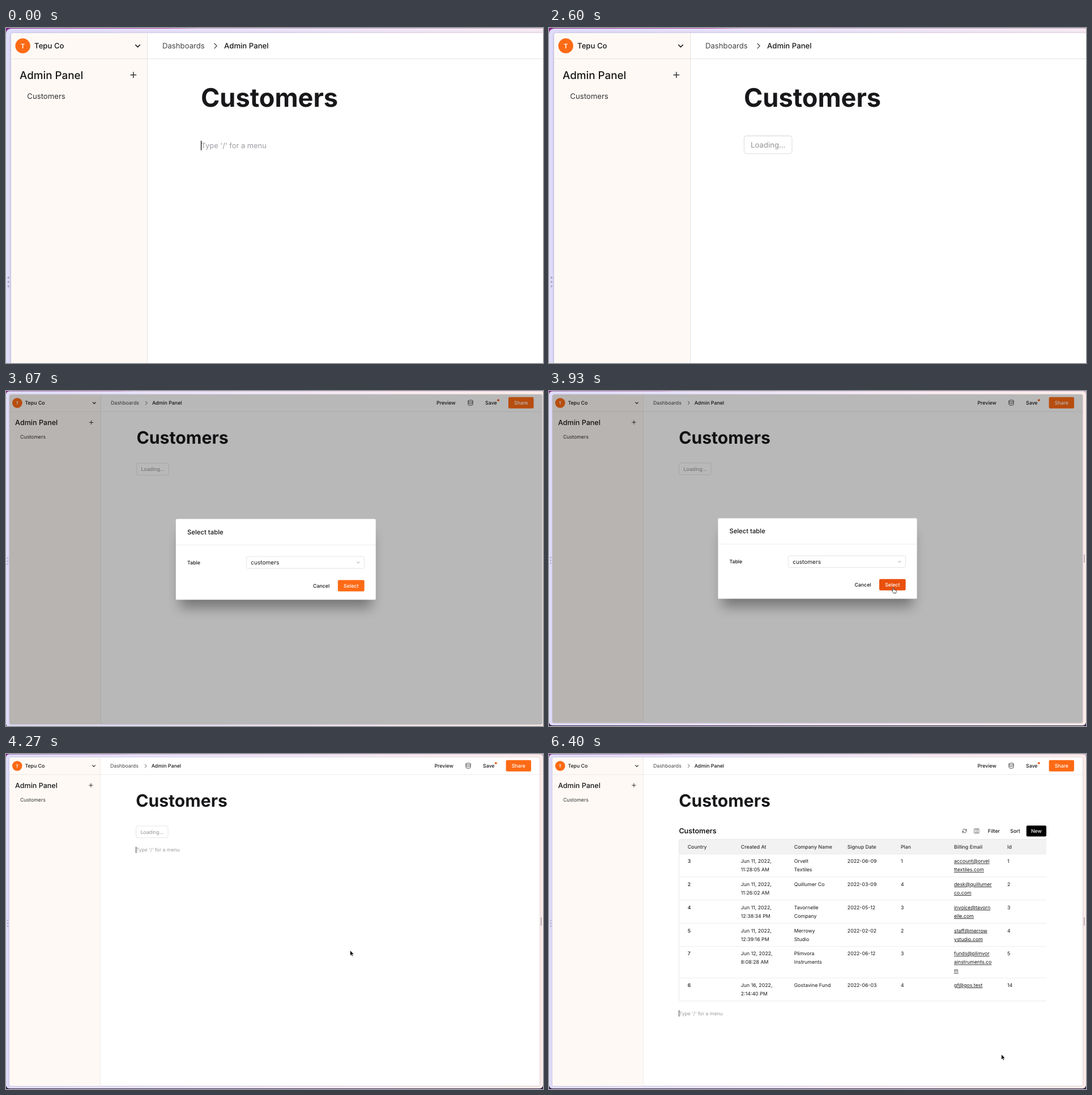
These frames come from a looping animation (948x591 px, 6.47 s). An HTML page:

```html
<!DOCTYPE html>
<html lang="en">
<head>
<meta charset="utf-8">
<title>Admin panel</title>
<style>
html, body { margin: 0; width: 100%; height: 100%; overflow: hidden; background: #fff; }
svg { display: block; width: 948px; height: 591px; }
text { font-family: Inter, sans-serif; font-optical-sizing: none; text-rendering: geometricPrecision; white-space: pre; }
</style>
</head>
<body>
<svg id="stage" viewBox="0 0 948 591"></svg>
<script>
const LOOP = 6470;
const UNIT = 0.627; // stage pixels per page pixel
const SMALL = 14 * UNIT, BASE = 16 * UNIT, LARGE = 18 * UNIT, XL = 20 * UNIT, HUGE = 48 * UNIT;
const INK = '#171717', GREY = '#9c9ca3', ORANGE = '#fd6a15', LINE = '#e4e4e4';
const stage = document.getElementById('stage');
const $ = id => document.getElementById(id);

// y is the middle of the capital letters
const text = (x, y, str, { size = SMALL, weight = 400, fill = INK, extra = '' } = {}) =>
  `<text x="${x}" y="${(y + size * 0.364).toFixed(2)}" font-size="${size}" font-weight="${weight}" fill="${fill}" ${extra}>${str}</text>`;
const rect = (x, y, w, h, fill, extra = '') =>
  `<rect x="${x}" y="${y}" width="${w}" height="${h}" fill="${fill}" ${extra}/>`;
const path = (d, stroke = INK, width = 1, extra = '') =>
  `<path d="${d}" fill="none" stroke="${stroke}" stroke-width="${width}" stroke-linecap="round" stroke-linejoin="round" ${extra}/>`;
const dot = (x, y, r, fill) => `<circle cx="${x}" cy="${y}" r="${r}" fill="${fill}"/>`;
const group = (id, body, extra = '') => `<g id="${id}" ${extra}>${body}</g>`;
const gradient = (id, stops) =>
  `<linearGradient id="${id}">${stops.map(([at, color]) => `<stop offset="${at}" stop-color="${color}"/>`).join('')}</linearGradient>`;
const blur = (id, amount) =>
  `<filter id="${id}" x="-40%" y="-60%" width="180%" height="220%"><feGaussianBlur stdDeviation="${amount}"/></filter>`;

const defs = `<defs>
  ${gradient('wall', [[0, '#83208a'], [0.2, '#b5409f'], [0.24, '#c79cca'], [1, '#d3b3d4']])}
  ${gradient('mist', [[0, '#dfdcfa'], [0.35, '#ebe3f8'], [0.7, '#f8ebf2'], [1, '#fbece9']])}
  ${blur('soft', 11)}${blur('near', 3)}${blur('edge', 1.3)}
</defs>`;

const frame = () =>
  rect(0, 0, 948, 300, 'url(#wall)') + rect(0, 300, 948, 291, '#35204c') +
  rect(0, 0.6, 948, 589.5, 'url(#mist)', 'rx="6"') +
  [293.6, 298.7, 303.8].map(y => dot(2.9, y, 1.2, '#aaa8c0')).join('') +
  rect(944, 288, 1.8, 15, '#b3adb2', 'rx=".9"') +
  rect(6, 6.5, 936, 579, '#55476a', 'rx="3" opacity=".4" filter="url(#edge)"') +
  rect(6, 6, 936, 579.5, '#fff', 'rx="3"');

const sidebar = () =>
  `<path d="M9 6H166V585.5H9a3 3 0 0 1-3-3V9a3 3 0 0 1 3-3Z" fill="#fef9f5"/>` +
  rect(166, 6, 0.7, 579.5, LINE) + rect(6, 35.8, 936, 0.7, LINE) +
  dot(19.75, 21, 14 * UNIT, ORANGE) +
  text(19.75, 21, 'T', { size: 7.4, weight: 600, fill: '#fff', extra: 'text-anchor="middle"' }) +
  text(33.4, 21.1, 'Tepu Co', { weight: 500 }) +
  path('M152.5 19.9L155 22.4L157.5 19.9', '#262626', 1.1) +
  text(16, 55.3, 'Admin Panel', { size: XL, weight: 500 }) +
  path('M146.7 55.2H153.1M149.9 52V58.4', '#333', 1) +
  text(24.9, 80.4, 'Customers', { fill: '#333' });

const header = () =>
  text(184, 21.1, 'Dashboards', { fill: '#444' }) +
  path('M245.4 18.3L248.1 21.1L245.4 23.9', '#444', 0.9) +
  text(256.7, 21.1, 'Admin Panel', { weight: 500 }) +
  text(756.4, 21, 'Preview', { weight: 500 }) +
  path('M812 17.6V23.6C812 25.8 820 25.8 820 23.6V17.6M812 20.6C812 22.7 820 22.7 820 20.6M812 17.6C812 15.4 820 15.4 820 17.6C820 19.7 812 19.7 812 17.6Z', '#333', 0.9) +
  text(842, 21, 'Save', { weight: 500 }) + dot(864.8, 16.2, 1.9, '#f4601c') +
  rect(882.6, 10.7, 44.4, 20, ORANGE, 'rx="2.2"') +
  text(904.8, 20.8, 'Share', { weight: 500, fill: '#fff', extra: 'text-anchor="middle"' });

const heading = () => text(229.3, 81.8, 'Customers', { size: HUGE, weight: 700, fill: '#18181b' });

const loading = () =>
  rect(229.6, 126.9, 56.4, 20.9, '#fff', `rx="3" stroke="#dcdcdc" stroke-width=".7"`) +
  text(237.4, 137.4, 'Loading...', { fill: '#929292' });

const dialog = () =>
  rect(6, 6, 936, 579.5, '#000', 'rx="3" opacity=".28"') +
  rect(306, 250, 336, 130, '#000', 'opacity=".36" filter="url(#soft)"') +
  rect(298.4, 224.6, 351.2, 142, '#fff', 'rx="2.2"') + rect(298.4, 269.7, 351.2, 0.7, LINE) +
  text(318.4, 247.3, 'Select table', { size: LARGE, weight: 500 }) +
  text(318.4, 301.1, 'Table', { weight: 500 }) +
  rect(422.4, 290.6, 207, 20.8, '#fff', 'rx="2.5" stroke="#d9d9d9" stroke-width=".7"') +
  text(430.2, 301, 'customers', { size: BASE }) +
  path('M616.6 300.1L618.8 302.3L621 300.1', '#777', 0.8) +
  text(539.4, 342, 'Cancel', { weight: 500 }) +
  `<rect id="confirm" x="583" y="331.8" width="46.6" height="20" rx="2.2"/>` +
  text(606.3, 341.9, 'Select', { weight: 500, fill: '#fff', extra: 'text-anchor="middle"' });

const COLUMNS = ['Country', 'Created At', 'Company Name', 'Signup Date', 'Plan', 'Billing Email', 'Id'];
const ROWS = [
  ['3', 'Jun 11, 2022,|11:28:05 AM', 'Orvelt|Textiles', '2022-06-09', '1', 'account@orvel|ttextiles.com', '1'],
  ['2', 'Jun 11, 2022,|11:26:02 AM', 'Quillumer Co', '2022-03-09', '4', 'desk@quillumer|co.com', '2'],
  ['4', 'Jun 11, 2022,|12:38:34 PM', 'Tavornelle|Company', '2022-05-12', '3', 'invoice@tavorn|elle.com', '3'],
  ['5', 'Jun 11, 2022,|12:39:16 PM', 'Merrowy|Studio', '2022-02-02', '2', 'staff@merrow|ystudio.com', '4'],
  ['7', 'Jun 12, 2022,|8:08:28 AM', 'Plimvora|Instruments', '2022-06-12', '3', 'funds@plimvor|ainstruments.co|m', '5'],
  ['6', 'Jun 16, 2022,|2:14:40 PM', 'Gostavine Fund', '2022-06-03', '4', 'gf@gos.test', '14'],
];
const columnX = i => 244.7 + i * 94.05;

function table() {
  const pitch = 24 * UNIT;
  let y = 176.2, rows = '';
  for (const row of ROWS) {
    const cells = row.map(cell => cell.split('|'));
    cells.forEach((lines, col) => lines.forEach((line, n) => {
      rows += text(columnX(col).toFixed(1), y + 12.9 + n * pitch, line, {
        weight: col ? 400 : 500,
        extra: col === 5 ? 'text-decoration="underline"' : '',
      });
    }));
    y += 17 * UNIT + pitch * Math.max(...cells.map(lines => lines.length));
    if (row !== ROWS.at(-1)) rows += rect(229.6, y - 0.3, 648.4, 0.7, LINE);
  }
  return text(229.4, 135.2, 'Customers', { size: XL, weight: 600 }) +
    path('M730.2 134.8A3.4 3.4 0 0 1 736.4 134.1L737 135M737 132.6V135H734.7M736.8 136.6A3.4 3.4 0 0 1 730.6 137.4L730 136.5M730 138.9V136.5H732.3', '#333', 0.8) +
    path('M751 132H759V139.6H751ZM753.7 132V139.6M756.3 132V139.6', '#444', 0.7) +
    text(774.8, 135.8, 'Filter', { weight: 500 }) + text(814.3, 135.8, 'Sort', { weight: 500 }) +
    rect(842.8, 126.2, 35.2, 19.2, '#000', 'rx="2.2"') +
    text(860.4, 135.9, 'New', { weight: 500, fill: '#fff', extra: 'text-anchor="middle"' }) +
    `<path d="M878 150.6H232.4a2.8 2.8 0 0 0-2.8 2.8V176.2H878Z" fill="#f2f2f2"/>` +
    COLUMNS.map((name, i) => text(columnX(i).toFixed(1), 163.4, name, { weight: 500, fill: '#333' })).join('') +
    rect(229.6, 176, 648.4, 0.7, LINE) + rows +
    path(`M878 150.6H232.4a2.8 2.8 0 0 0-2.8 2.8V${y - 2.8}a2.8 2.8 0 0 0 2.8 2.8H878`, '#dedede', 0.7, 'style="stroke-linecap:butt"');
}

const blockHandle = () =>
  path('M187 136H193M190 133V139', '#aaa', 0.8) +
  [0, 1, 2].map(n => dot(204, 133.4 + n * 2.6, 0.8, '#aaa') + dot(206.8, 133.4 + n * 2.6, 0.8, '#aaa')).join('');

const cursor = () =>
  group('arrow', `<path d="M0 0V9.2L2.1 7.3L3.5 10.4L5 9.7L3.6 6.7H6.5Z" fill="#000" stroke="#fff" stroke-width=".6"/>`) +
  group('hand', `<path d="M3 .5C3.9 .5 3.9 1.2 3.9 1.6V4C5 3.6 5.6 4 5.8 4.4C6.8 4.2 7.2 4.6 7.4 5C8.6 5 8.7 5.6 8.6 6.8C8.5 8.4 8 8.6 7.8 10H3.6C3.2 8.8 1.6 7.2 .8 6C.6 5 1.6 4.8 2.1 5.8V1.6C2.1 1.2 2.1 .5 3 .5Z" fill="#fff" stroke="#111" stroke-width=".8"/>`, 'transform="translate(-3 0)"');

stage.innerHTML = defs + group('scene',
  frame() + sidebar() + header() + heading() +
  group('loading', loading()) + group('table', table()) + group('handle', blockHandle()) +
  group('prompt',
    text(229.7, 0, "Type '/' for a menu", { size: 8.6, fill: GREY, extra: 'id="hint"' }) +
    text(229.7, 0, '', { extra: 'id="typed"' }) +
    rect(229.3, -5.6, 0.8, 11.2, '#000', 'id="caret"')) +
  group('menu', '') + group('dialog', dialog()) + group('cursor', cursor()));

const BLOCKS = ['Text', 'Heading', 'Table', 'Chart', 'Button', 'List', 'Divider'];
function menu(query) {
  const items = BLOCKS.filter(name => name.toLowerCase().includes(query));
  const item = 21.3, height = items.length * item + 10.7, top = 210.5 - height / 2;
  return rect(47, top + 4, 174, height, '#000', 'opacity=".13" filter="url(#near)"') +
    rect(45, top, 178, height, '#fff', 'rx="3" stroke="#e2e2e2" stroke-width=".6"') +
    items.map((name, i) => {
      const y = top + 5.35 + i * item;
      return (i ? '' : rect(48.5, y + 0.4, 171, 20.5, '#f3f2f6', 'rx="2"')) + text(56, y + item / 2, name);
    }).join('');
}

const TYPING = [[1470, '/'], [1670, '/t'], [1730, '/ta'], [1870, '/tab'], [1930, '/tabl'], [2130, '/table'], [2600, '']];
const CURSOR = [[3270, 652, 356], [3530, 607.6, 346.6], [4270, 607.6, 346.6], [5200, 824, 424], [6290, 824, 424], [6400, 798.7, 530]];

const clamp = v => Math.min(1, Math.max(0, v));
const span = (t, from, to) => clamp((t - from) / (to - from));
const smooth = p => p * p * (3 - 2 * p);
const within = (t, ...ranges) => ranges.some(([from, to]) => t >= from && t < to);
const show = (id, on) => $(id).setAttribute('display', on ? 'inline' : 'none');

function cursorAt(t) {
  const next = CURSOR.findIndex(([at]) => at > t);
  if (next < 1) return CURSOR.at(next).slice(1);
  const [t0, x0, y0] = CURSOR[next - 1], [t1, x1, y1] = CURSOR[next];
  const p = smooth(span(t, t0, t1));
  return [x0 + (x1 - x0) * p, y0 + (y1 - y0) * p];
}

let lastTyped = null;
function draw(t) {
  const zoom = 1 + 0.5 * (1 - span(t, 2670, 3200)) ** 3.3;
  $('scene').setAttribute('transform', `scale(${zoom})`);

  const typed = TYPING.findLast(([at]) => t >= at)?.[1] ?? '';
  if (typed !== lastTyped) {
    lastTyped = typed;
    $('typed').textContent = typed;
    $('menu').innerHTML = typed ? menu(typed.slice(1)) : '';
    $('caret').setAttribute('x', 229.3 + (typed ? $('typed').getComputedTextLength() + 0.4 : 0));
  }
  show('hint', !typed);
  show('prompt', !within(t, [2600, 4200]));
  show('caret', within(t, [0, 330], [800, 1330], [1470, 5600], [6130, LOOP]));
  const promptY = t < 2600 ? 138.2 : t < 4800 ? 169.1 : 457.6;
  $('prompt').setAttribute('transform', `translate(0 ${promptY})`);

  show('loading', within(t, [2600, 4800]));
  show('table', t >= 4800);
  show('handle', within(t, [4800, 6400]));

  const dim = span(t, 2670, 2790) * (1 - span(t, 4100, 4260));
  show('dialog', dim > 0);
  $('dialog').setAttribute('opacity', dim);
  $('confirm').setAttribute('fill', t < 3870 ? ORANGE : '#e9500c');

  const overButton = within(t, [3460, 4200]);
  show('cursor', t >= 3270);
  show('hand', overButton);
  show('arrow', !overButton);
  $('cursor').setAttribute('transform', `translate(${cursorAt(t).join(' ')})`);
}

let start;
function tick(now) {
  start ??= now;
  draw((now - start) % LOOP);
  requestAnimationFrame(tick);
}
draw(0);
requestAnimationFrame(tick);
</script>
</body>
</html>
```
